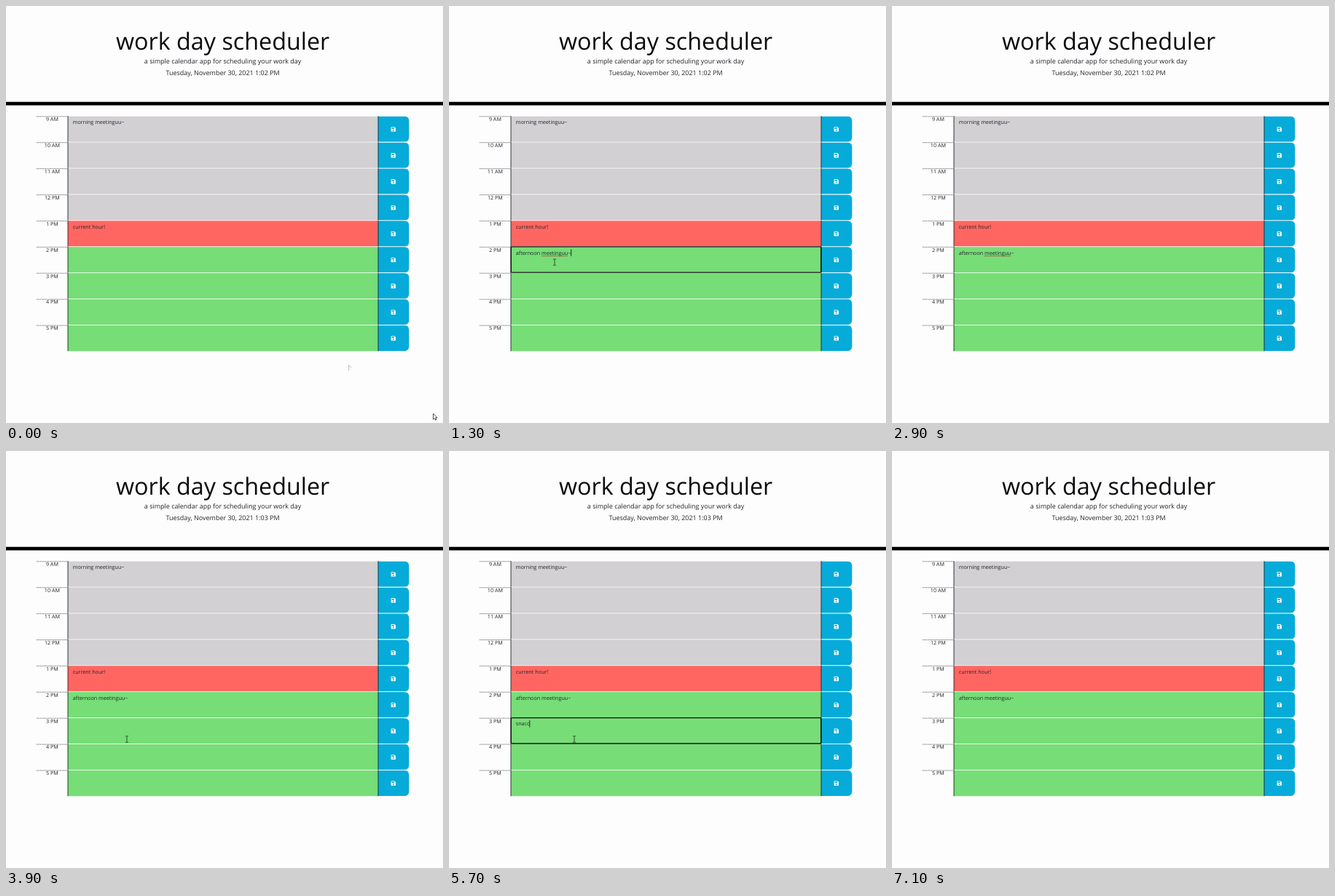
Recreate the animation shown at these times as an HTML page. Size 600 px wide and 573 px high, loop 7.2 s.

```html
<!DOCTYPE html>
<html lang="en">
<head>
<meta charset="utf-8">
<title>work day scheduler</title>
<style>
  html, body { margin: 0; width: 100%; height: 100%; overflow: hidden; background: #fefdfe; }
  svg { display: block; width: 600px; height: 573px; font-family: "Open Sans", sans-serif; text-rendering: geometricPrecision; }
  .mid { text-anchor: middle; }
  .title { font-size: 32.3px; fill: #0a0a0c; }
  .lead { font-size: 8.98px; fill: #212529; }
  .small { font-size: 7.18px; fill: #212529; white-space: pre; }
  .past { fill: #d2d0d2; }
  .present { fill: #ff6661; }
  .future { fill: #77dd77; }
  .save { fill: #06abd9; }
  .dash { stroke: #333; stroke-width: .7; stroke-dasharray: 1.4 .9; }
  .edge { stroke: #1a2226; stroke-width: .9; }
  .gap { stroke: #fff; stroke-width: .9; opacity: .85; }
  .focus { fill: none; stroke: #0b120b; stroke-width: 1.3; }
  .squiggle { fill: none; stroke: #b02a2a; stroke-width: .7; }
</style>
</head>
<body>
<svg viewBox="0 0 600 573">
  <defs>
    <g id="disk">
      <path d="M-3.2-2.6q0-.6.6-.6H1.7L3.2-1.7V2.6q0 .6-.6.6H-2.6q-.6 0-.6-.6Z" fill="#fff"/>
      <path class="save" d="M-2.3-2.3H1.3V-.6H-2.3Z"/>
      <circle class="save" cy="1.3" r=".95"/>
    </g>
  </defs>
  <text class="title mid" x="297.6" y="60.4">work day scheduler</text>
  <text class="lead mid" x="297.6" y="78.5">a simple calendar app for scheduling your work day</text>
  <text class="lead mid" id="date" x="297.6" y="94.6"></text>
  <path d="M0 131.8H600V136.4H0Z"/>
  <g id="rows"></g>
  <rect class="focus" id="focus" x="85.2" width="425.6" height="35.3" rx=".8"/>
  <path class="squiggle" id="squiggle"/>
  <path id="caret" stroke="#000" stroke-width=".8"/>
  <path id="ghost" d="M470.7 501V493.3L474 497" fill="none" stroke="#a9a9b4" stroke-width=".8"/>
  <g id="arrow">
    <path d="M0 0V8L1.9 6.4 3.1 9 4.4 8.4 3.2 5.8H5.6Z" fill="#fff" stroke="#222" stroke-width=".8"/>
  </g>
  <g id="beam">
    <path d="M-2-4.2H-.6L0-3.8.6-4.2H2M0-3.8V3.8M-2 4.2H-.6L0 3.8.6 4.2H2" fill="none" stroke="#1d331d" stroke-width=".8"/>
  </g>
  <g id="hand">
    <path d="M-.7 0Q0-.8.7 0V3.2L3.6 4V6.5L2.8 9H-1.2L-3 5.6-2.2 4.8-.7 6Z" fill="#fff" stroke="#222" stroke-width=".7"/>
  </g>
</svg>
<script>
const LOOP = 7200, STEP = 100, TOP = 151.2, ROW = 35.9, LEFT = 85, RIGHT = 511;
const $ = id => document.getElementById(id);
const hours = ['9 AM', '10 AM', '11 AM', '12 PM', '1 PM', '2 PM', '3 PM', '4 PM', '5 PM'];
const fixed = { 0: 'morning meetinguu~', 4: 'current hour!' };
const rowY = i => TOP + ROW * i;

$('rows').innerHTML = hours.map((hour, i) => {
  const y = rowY(i), b = y + ROW;
  const kind = i < 4 ? 'past' : i > 4 ? 'future' : 'present';
  return `<path class="dash" d="M42 ${y + .6}H84.5"/>
    <text class="small mid" x="63.4" y="${y + 6.9}">${hour}</text>
    <path class="${kind}" d="M${LEFT} ${y}H${RIGHT}V${b}H${LEFT}Z"/>
    <path class="save" d="M${RIGHT} ${y + .3}H546.8q6.6 0 6.6 6.6V${b - 6.9}q0 6.6-6.6 6.6H${RIGHT}Z"/>
    <path class="gap" d="M${LEFT} ${y}H553"/>
    <path class="edge" d="M${LEFT} ${y}V${b}M${RIGHT} ${y}V${b}"/>
    <text class="small" id="note${i}" x="91.8" y="${y + 10.8}">${fixed[i] || ''}</text>
    <use href="#disk" id="icon${i}" transform="translate(531.8 ${y + 18.2})"/>`;
}).join('');

const pen = document.createElement('canvas').getContext('2d');
pen.font = '100px "Open Sans", sans-serif';
const endX = s => 91.8 + pen.measureText(s).width * .0718;

// Pointer stops: time, x, y
const visits = [
  [[0, 586.6, 560], [100, 586.6, 560], [400, 145, 352], [1300, 145, 352], [1600, 532, 350], [1900, 532, 350], [2200, 110, 48]],
  [[3500, 120, 80], [3900, 166, 396], [4300, 166, 396], [4400, 167, 391], [4500, 168, 392],
   [4700, 172, 396], [5800, 172, 396], [6100, 150, 96]]
];

function pointer(t) {
  const path = visits.find(v => t >= v[0][0] && t <= v[v.length - 1][0]);
  if (!path) return null;
  const i = Math.max(1, path.findIndex(p => p[0] >= t));
  const [a, b] = [path[i - 1], path[i]];
  const k = (t - a[0]) / (b[0] - a[0]), e = k * k * (3 - 2 * k);
  return { x: a[1] + (b[1] - a[1]) * e, y: a[2] + (b[2] - a[2]) * e };
}

const show = (id, on) => $(id).setAttribute('visibility', on ? 'visible' : 'hidden');
const typed = (word, t, start, pace) => word.slice(0, Math.max(0, Math.floor((t - start) / pace)));

function underline(row, before, word) {
  const y = rowY(row) + 12.4, end = endX(before + word);
  let d = '';
  for (let x = endX(before), k = 0; x < end; x += .9, k++) d += `${k ? 'L' : 'M'}${x} ${y + k % 2 * .8}`;
  $('squiggle').setAttribute('d', d);
}

function draw(t) {
  $('date').textContent = `Tuesday, November 30, 2021 1:0${t < 3200 ? 2 : 3} PM`;
  const notes = {
    5: typed('afternoon meetinguu~', t, 500, 35),
    6: t < 6800 ? typed('snacc', t, 4870, 130) : ''
  };
  for (const i in notes) $('note' + i).textContent = notes[i];

  const active = t >= 500 && t < 1700 ? 5 : t >= 4700 && t < 6800 ? 6 : 0;
  show('focus', active);
  show('caret', active);
  if (active) {
    const y = rowY(active);
    $('focus').setAttribute('y', y + .1);
    $('caret').setAttribute('d', `M${endX(notes[active]) + .3} ${y + 3.6}v9.4`);
  }

  const first = t >= 1200 && t < 3200, second = t >= 5900 && t < 6800;
  show('squiggle', first || second);
  if (first) underline(5, 'afternoon ', 'meetinguu');
  if (second) underline(6, '', 'snacc');

  const grow = Math.max(0, Math.min(1, (t - 1500) / 300, (2200 - t) / 300));
  $('icon5').setAttribute('transform', `translate(531.8 ${rowY(5) + 18.2}) scale(${1 + .25 * grow})`);

  const p = pointer(t);
  const inRows = p && p.y > TOP && p.y < rowY(9);
  const shape = !p ? '' : inRows && p.x > LEFT && p.x < RIGHT ? 'beam' : inRows && p.x >= RIGHT && p.x < 553 ? 'hand' : 'arrow';
  for (const id of ['arrow', 'beam', 'hand']) {
    show(id, id === shape);
    if (id === shape) $(id).setAttribute('transform', `translate(${p.x} ${p.y})`);
  }
  show('ghost', t < 100);
}

let last = -1;
const begin = performance.now();
function tick() {
  const t = Math.floor((performance.now() - begin) % LOOP / STEP) * STEP;
  if (t !== last) draw(last = t);
  requestAnimationFrame(tick);
}
tick();
</script>
</body>
</html>
```
